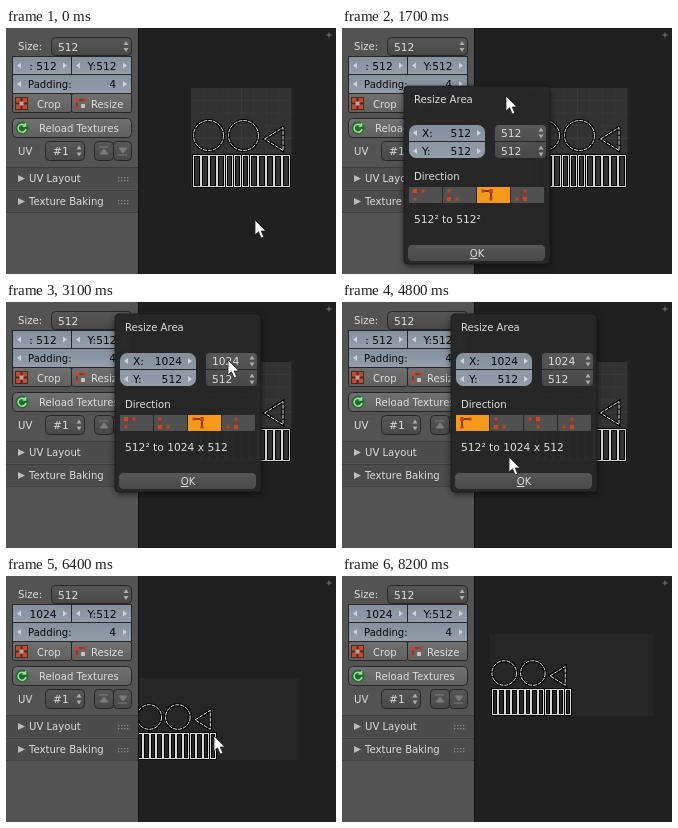
An HTML page that plays this animation: 330x246 px, repeating every 8.5 s.

```html
<!DOCTYPE html>
<html lang="en">
<head>
<meta charset="utf-8">
<title>Resize area</title>
<style>
  html, body { margin: 0; width: 100%; height: 100%; overflow: hidden; background: #202020; }
  svg { display: block; width: 100vw; height: 100vh; }
  text { font: 10.1px "DejaVu Sans", sans-serif; fill: #dcdcdc; white-space: pre; }
  .num { font-size: 10.7px; }
  .ink { fill: #080808; }
  .mid { text-anchor: middle; }
  .end { text-anchor: end; }
  .edge { stroke: #262626; }
  .uv * { fill: none; vector-effect: non-scaling-stroke; }
  .uv rect { shape-rendering: crispEdges; }
  .halo { stroke: #000; stroke-width: 3; }
  .line { stroke: #e8e8e8; stroke-width: 1; stroke-dasharray: 4 1; }
  .uv rect.line { stroke: #d8d8d8; stroke-dasharray: none; }
  #popup { filter: drop-shadow(0 2px 3px rgba(0, 0, 0, .55)); }
</style>
</head>
<body>
<svg viewBox="0 0 330 246">
  <defs>
    <linearGradient id="menu" x2="0" y2="1"><stop stop-color="#575757"/><stop offset="1" stop-color="#484848"/></linearGradient>
    <linearGradient id="button" x2="0" y2="1"><stop stop-color="#707070"/><stop offset="1" stop-color="#606060"/></linearGradient>
    <linearGradient id="field" x2="0" y2="1"><stop stop-color="#84909c"/><stop offset="1" stop-color="#939eaa"/></linearGradient>
    <clipPath id="editor"><path d="M133 0H330V246H133Z"/></clipPath>
  </defs>
  <path fill="#202020" d="M0 0H330V246H0Z"/>
  <g clip-path="url(#editor)">
    <g id="view">
      <rect id="area" height="100.5"/>
      <g id="grid" fill="none" stroke="#3a3a3a" stroke-width=".7"></g>
      <g class="uv" id="shapes"></g>
    </g>
    <path d="M320.5 7h5M323 4.5v5" stroke="#777"/>
  </g>
  <g id="panel"></g>
  <g id="popup"></g>
  <path id="cursor" d="M0 0V15L3.5 11.8 6.2 18 8.8 17 6.2 11H10.8Z" fill="#fff" stroke="#222" stroke-width=".8"/>
</svg>
<script>
const $ = id => document.getElementById(id);
const repeat = (n, draw) => Array.from({length: n}, (_, i) => draw(i)).join('');

// Widgets
const label = (x, y, str, cls = '', id = '') =>
  `<text x="${x}" y="${y}" class="${cls}" id="${id}">${str}</text>`;
const box = (x, y, w, h, look, r = 4) =>
  `<rect x="${x + .5}" y="${y + .5}" width="${w - 1}" height="${h - 1}" rx="${r}" fill="url(#${look})" class="edge"/>`;
const dot = (x, y, size, fill) => `<rect x="${x}" y="${y}" width="${size}" height="${size}" fill="${fill}"/>`;
const rule = (x1, x2, y, color) => `<path d="M${x1} ${y + .5}H${x2}" stroke="${color}"/>`;
const sideArrows = (x1, x2, y) =>
  `<path d="M${x1} ${y}l4 -3v6ZM${x2} ${y}l-4 -3v6Z" fill="#ccd3da"/>`;
const chevrons = (x, y) =>
  `<path d="M${x - 2.5} ${y - 1.5}h5l-2.5 -4ZM${x - 2.5} ${y + 1.5}h5l-2.5 4Z" fill="#aaa"/>`;
const menu = (x, y, w, h) => box(x, y, w, h, 'menu') + chevrons(x + w - 6, y + h / 2);

// Bracket icon with its corner at the top left unless flipped
const corner = (x, y, sx = 1, sy = 1) =>
  `<g transform="translate(${x} ${y}) scale(${sx} ${sy})">
    <path d="M-4 5V-4H5" fill="none" stroke="#7d3d2c" stroke-width="2"/>
    ${dot(-6, -6, 4, '#c9482b')}${dot(-5.5, 2.5, 3, '#b8452c')}${dot(2.5, -5.5, 3, '#b8452c')}</g>`;

function drawShapes() {
  const outline = cls =>
    repeat(2, i => `<circle cx="${17.5 + 35 * i}" cy="47.5" r="15" class="${cls}"/>`) +
    `<path d="M73.5 51L92 39.5V62.5Z" class="${cls}"/>` +
    repeat(12, i => `<rect x="${2.6 + i * 8.12}" y="67.5" width="6.6" height="31" class="${cls}"/>`);
  $('shapes').innerHTML = outline('halo') + outline('line');
  $('grid').innerHTML = repeat(7, i => {
    const p = (i + 1) * 12.56;
    return `<path d="M${p} 0V100.5M0 ${p}H100.5" ${i === 3 ? 'stroke="#454545"' : ''}/>`;
  });
}

function drawPanel() {
  const fold = (y, str) =>
    `<path d="M0 ${y}H132V${y + 22}H0Z" fill="#4b4b4b"/><path d="M12 ${y + 8}l7 3.5l-7 3.5Z" fill="#bbb"/>` +
    rule(0, 132, y, '#3d3d3d') + label(23, y + 15, str) +
    repeat(8, i => dot(112 + i % 4 * 3, y + 10 + (i > 3) * 3, 1.3, '#8a8a8a'));
  $('panel').innerHTML =
    '<path d="M0 0H132V246H0Z" fill="#535353"/><path d="M132.5 0V246" stroke="#111"/>' +
    label(12, 22, 'Size:') + menu(45, 9, 81, 19) + label(52, 23, '512', 'num') +
    box(6, 28, 60, 19, 'field', 0) + box(65, 28, 61, 19, 'field', 0) + box(6, 46, 120, 20, 'field', 0) +
    sideArrows(11, 61, 37.5) + sideArrows(70, 121, 37.5) + sideArrows(11, 121, 56) +
    label(37, 42, ': 512', 'num ink mid', 'width') + label(96, 42, 'Y:512', 'num ink mid') +
    label(22, 60, 'Padding:', 'ink') + label(110, 60, '4', 'num ink end') +
    box(6, 65, 60, 20, 'button', 2) + box(65, 65, 61, 20, 'button', 2) +
    dot(9, 69, 13, '#4a2a22') + repeat(4, i => dot(10 + i % 2 * 6.5, 70 + (i > 1) * 6.5, 4.5, '#c9482b')) +
    dot(13.5, 73.5, 4, '#b9a59e') + label(31, 79.5, 'Crop') +
    corner(75, 76) + dot(75, 76, 4, '#c9bdb8') + label(85, 79.5, 'Resize') +
    box(6, 90, 120, 20, 'button') + label(33, 104, 'Reload Textures') +
    '<circle cx="16" cy="100" r="6.5" fill="#256b30"/><path d="M19 97.5A4 4 0 1 0 20 101M19.5 95v3h-3" fill="none" stroke="#9be09f" stroke-width="1.5"/>' +
    label(12, 127, 'UV') + menu(39, 113, 40, 20) + label(47, 127, '#1', 'num') +
    box(88, 113, 20, 20, 'menu') + box(107, 113, 19, 20, 'menu') +
    '<path d="M93 119h9M94 126l4-5l4 5ZM112 127h9M113 120l4 5l4-5Z" fill="#7a7a7a" stroke="#7a7a7a"/>' +
    fold(139, 'UV Layout') + fold(162, 'Texture Baking') + rule(0, 132, 184, '#414141');
}

function drawPopup() {
  $('popup').innerHTML =
    '<rect width="146" height="178" rx="4" fill="#282828" fill-opacity=".97" stroke="#171717" stroke-width=".7"/>' +
    label(10, 17, 'Resize Area') +
    box(4, 38, 78, 35, 'field', 8) + rule(5, 81, 55, '#262626') + box(90, 38, 53, 35, 'menu') + rule(91, 142, 55, '#262626') +
    repeat(2, i => {
      const y = 47 + 18 * i;
      return sideArrows(9, 77, y) + chevrons(137, y) + label(18, y + 4, 'XY'[i] + ':', 'num ink') +
        label(67, y + 4, '512', 'num ink end', 'size' + i) + label(97, y + 4, '512', 'num', 'pick' + i);
    }) +
    label(10, 94, 'Direction') +
    repeat(4, i => `<rect x="${4.5 + i * 34}" y="100.5" width="34" height="17" class="edge dir"/>` +
      corner(15 + i * 34, 109, i < 2 ? 1 : -1, i % 2 ? -1 : 1)) +
    label(10, 137, '', 'num', 'summary') +
    box(3, 158, 139, 18, 'menu', 5) +
    label(73, 171, '<tspan text-decoration="underline">O</tspan>K', 'mid');
}

// Pointer trips; each one slows down towards its end
const home = {x: 249, y: 192};
const trips = [
  {from: 0, to: 600, x: 82, y: 72},
  {from: 900, to: 1700, x: 164, y: 68},
  {from: 1700, to: 2200, x: 211, y: 22},
  {from: 2300, to: 2900, x: 222, y: 58},
  {from: 3400, to: 4100, x: 125, y: 124},
  {from: 4500, to: 4800, x: 167, y: 155},
  {from: 4800, to: 5100, x: 174, y: 178},
  {from: 5600, to: 6400, x: 208, y: 160},
  {from: 6600, to: 7200, x: 227, y: 116},
  {from: 7500, to: 8200, x: 40, y: 260}];

const clamp = (v, lo, hi) => Math.min(hi, Math.max(lo, v));
const easeOut = p => 1 - (1 - p) ** 2;

function pointer(t) {
  return trips.reduce((pos, trip) => {
    const p = easeOut(clamp((t - trip.from) / (trip.to - trip.from), 0, 1));
    return {x: pos.x + (trip.x - pos.x) * p, y: pos.y + (trip.y - pos.y) * p};
  }, home);
}

// The dialog hangs on the pointer but stays inside the window
const dialog = ({x, y}, t) => t < 2200
  ? {x: Math.max(28, x - 102), y: Math.min(58, y - 10)}
  : {x: 109, y: 12};

const zoom = (v, pivot, k) =>
  ({x: pivot.x + (v.x - pivot.x) * k, y: pivot.y + (v.y - pivot.y) * k, s: v.s * k});

function viewport(t) {
  if (t < 5500) return {x: 185, y: 60, s: 1};
  const clicks = clamp((t - 5900) / 100, 0, 4);
  let v = zoom({x: 35, y: 10, s: 2}, {x: 194, y: 166}, .8 ** clicks);
  if (t < 6600) return v;
  const grab = pointer(6600), drop = pointer(Math.min(t, 7200));
  v = zoom(v, grab, .8);
  v.x += drop.x - grab.x;
  v.y += drop.y - grab.y;
  return t < 7400 ? v : zoom(v, drop, 1.25);
}

const place = (id, {x, y, s = 1}) => $(id).setAttribute('transform', `translate(${x} ${y}) scale(${s})`);

function render(t) {
  const resized = t >= 5500, wide = t >= 3100, picked = t >= 4400 ? 0 : 2;
  const at = pointer(t), pane = dialog(at, t);
  place('cursor', at);
  place('popup', {x: Math.round(pane.x), y: Math.round(pane.y)});
  place('view', viewport(t));
  $('popup').style.display = t >= 900 && !resized ? '' : 'none';
  $('grid').style.display = resized ? 'none' : '';
  $('area').setAttribute('width', resized ? 200 : 100.5);
  $('area').setAttribute('fill', resized ? '#262626' : '#323232');
  $('width').textContent = resized ? '1024' : ': 512';
  $('size0').textContent = $('pick0').textContent = wide ? '1024' : '512';
  $('summary').textContent = wide ? '512² to 1024 x 512' : '512² to 512²';
  document.querySelectorAll('.dir').forEach((el, i) => el.setAttribute('fill', i === picked ? '#f79a1c' : '#505050'));
}

drawShapes();
drawPanel();
drawPopup();
const start = performance.now();
let shown = -1;
function tick() {
  const t = Math.floor((performance.now() - start) % 8500 / 100) * 100;
  if (t !== shown) render(shown = t);
  requestAnimationFrame(tick);
}
tick();
</script>
</body>
</html>
```
